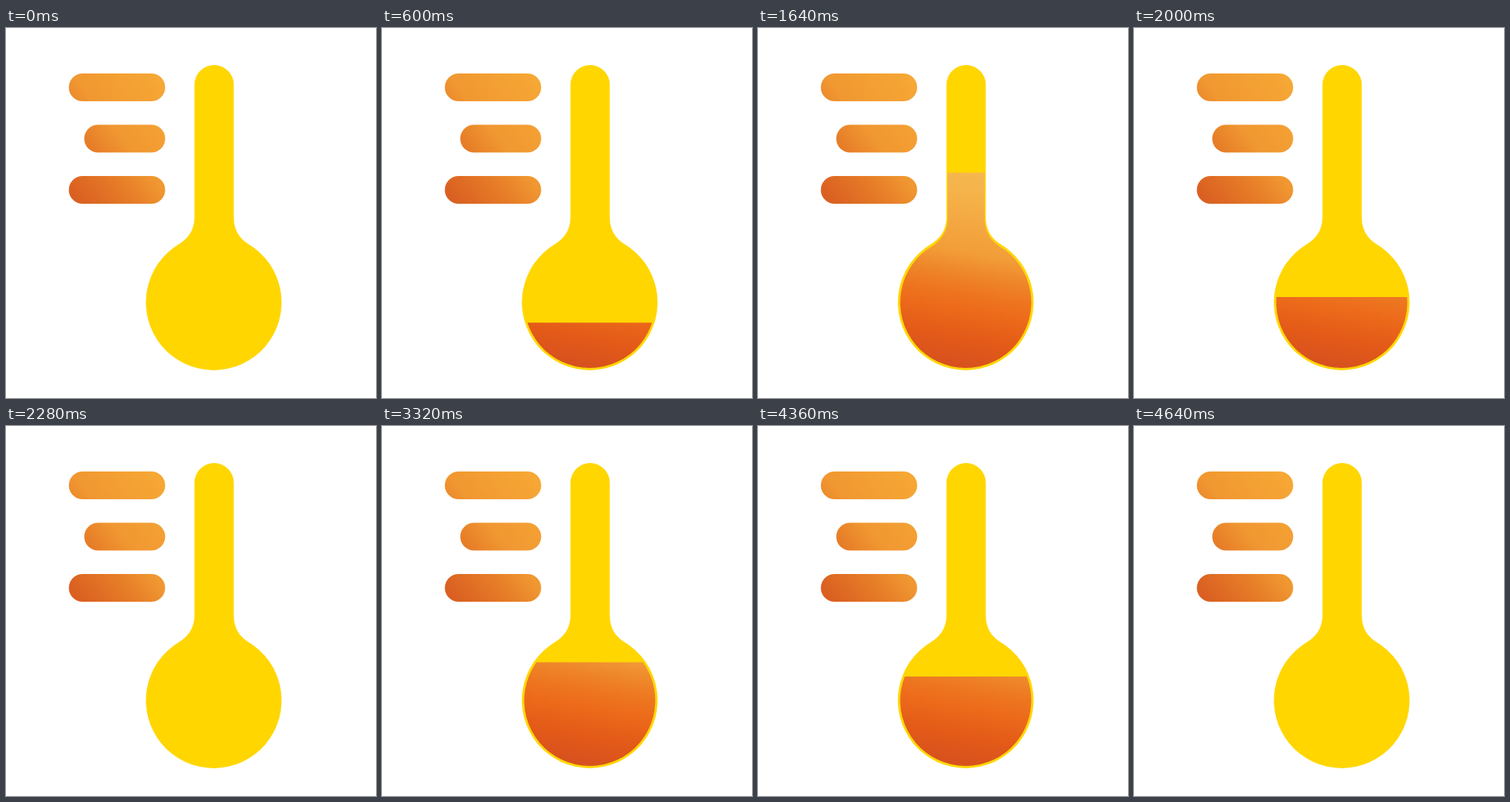
Recreate the animation shown at these times as an HTML page. Size 480 by 480 pixels, loop 5000 ms.

```html
<!DOCTYPE html>
<html lang="en">
<head>
<meta charset="utf-8">
<title>Thermometer</title>
<style>
  html, body { margin: 0; width: 100%; height: 100%; overflow: hidden; background: #fff; }
  svg { display: block; width: 100%; height: 100%; }
</style>
</head>
<body>
<svg viewBox="0 0 480 480">
  <defs>
    <linearGradient id="barFill" gradientUnits="userSpaceOnUse" x1="82" y1="210" x2="230" y2="92">
      <stop offset="0" stop-color="#da5f21"/>
      <stop offset=".31" stop-color="#e77e28"/>
      <stop offset=".5" stop-color="#f09731"/>
      <stop offset="1" stop-color="#f7a935"/>
    </linearGradient>
    <linearGradient id="liquidFill" gradientUnits="userSpaceOnUse" x1="290" y1="135" x2="235" y2="445">
      <stop offset="0" stop-color="#f6c05a"/>
      <stop offset=".28" stop-color="#f5b148"/>
      <stop offset=".5" stop-color="#f29d38"/>
      <stop offset=".59" stop-color="#ee8529"/>
      <stop offset=".66" stop-color="#ee7620"/>
      <stop offset=".74" stop-color="#ec691a"/>
      <stop offset=".85" stop-color="#e35a18"/>
      <stop offset=".98" stop-color="#d6501f"/>
    </linearGradient>
    <clipPath id="levelClip"><rect id="level" width="480" height="480"/></clipPath>
  </defs>

  <g fill="url(#barFill)">
    <rect x="81.5" y="59" width="125" height="36" rx="18"/>
    <rect x="101.5" y="125.5" width="105" height="36" rx="18"/>
    <rect x="81.5" y="192" width="125" height="36" rx="18"/>
  </g>

  <path fill="#ffd600" d="M244.5 73.5A25.5 25.5 0 0 1 295.5 73.5V246
    C295.5 262 303 273 314 280A88 88 0 1 1 225 280C236 273 244.5 262 244.5 246Z"/>
  <path fill="url(#liquidFill)" clip-path="url(#levelClip)" d="M246 140.5a12 12 0 0 1 12-12H282a12 12 0 0 1 12 12V248
    C294 264 302 275.5 312 282.4A85 85 0 1 1 227 282.4C237 275.5 246 264 246 248Z"/>
</svg>
<script>
  const LOOP = 5000, STEP = 40, EMPTY = 442, FULL = 128;
  const cycles = [
    { rise: [400, 1240], fall: [1440, 2280] },
    { rise: [2980, 3744], fall: [3950, 4630] }
  ];
  const level = document.getElementById('level');

  // Halfway between linear and smoothstep.
  function progress(t, [start, end]) {
    const u = Math.min(1, Math.max(0, (t - start) / (end - start)));
    return (u + u * u * (3 - 2 * u)) / 2;
  }

  function draw(now) {
    const t = Math.floor((now % LOOP) / STEP) * STEP;
    const filled = cycles.reduce((sum, c) => sum + progress(t, c.rise) - progress(t, c.fall), 0);
    level.setAttribute('y', EMPTY + (FULL - EMPTY) * filled);
    requestAnimationFrame(() => draw(performance.now()));
  }
  draw(performance.now());
</script>
</body>
</html>
```
